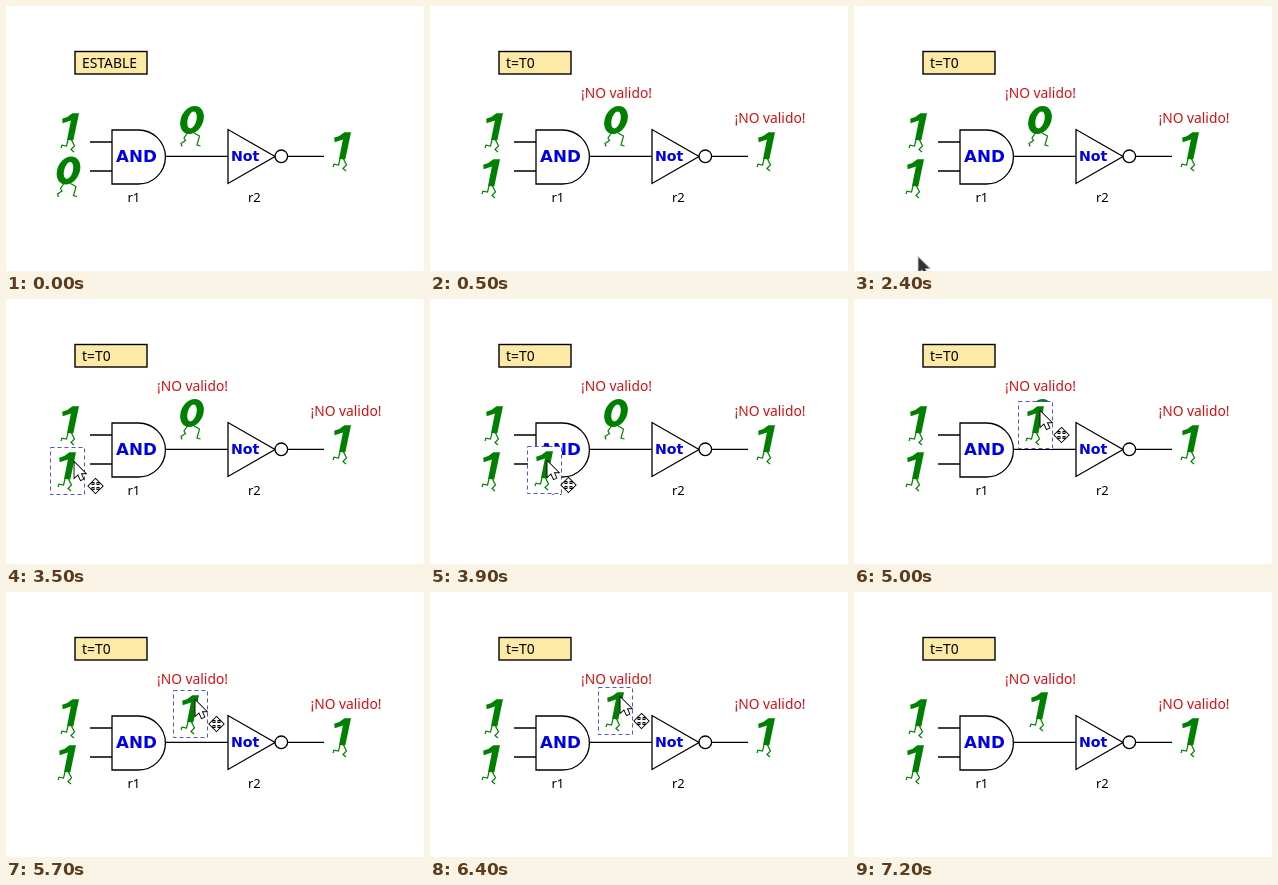
These frames come from a looping animation (418x265 px, 8000 ms). An HTML page with a canvas:

```html
<!DOCTYPE html>
<html lang="es">
<head>
<meta charset="utf-8">
<style>
html, body { margin: 0; width: 100%; height: 100%; overflow: hidden; background: #fff; }
canvas { display: block; }
</style>
</head>
<body>
<canvas id="stage" width="418" height="265"></canvas>
<script>
const ctx = document.getElementById('stage').getContext('2d');
const LOOP = 8000, STEP = 100;
const GREEN = '#008000', RED = '#d40f14', BLUE = '#0000e6';
const SANS = '"Noto Sans", "Open Sans", sans-serif';
const BOLD = '"DejaVu Sans", sans-serif';

const arrow = new Path2D('M0 0V15L3.6 11.8L6.2 17.6L8.8 16.4L6.3 10.8H10.8Z');
const moveCross = new Path2D('M0 -7L3 -4H1V-1H4V-3L7 0L4 3V1H1V4H3L0 7L-3 4H-1V1H-4V3L-7 0L-4 -3V-1H-1V-4H-3Z');
const handle = new Path2D('M-6 0L-2 -4V-1.5H2V-4L6 0L2 4V1.5H-2V4Z');
const oneBody = new Path2D('M25 4.3L19.3 31.6L13 31L16.9 11.6L8.7 14.3L8.2 9.8Q14 8.5 18.4 4.3Z');
const oneLegs = new Path2D('M14 31L12.5 37L8 36.2L7 39M17.5 31L20.5 37L17 40.5L20 43');
const zeroLegs = new Path2D('M-4 12L-8 18L-6.5 20.5L-11 23.5L-10 26.5M2 13L7.5 16L5 25L8.5 26');
const gates = new Path2D(
  'M106 124H132.4A27 27 0 0 1 132.4 178H106ZM222 123.5V177.5L269 150.5Z' +
  'M281.6 150.3A6.3 6.3 0 1 1 269 150.3A6.3 6.3 0 1 1 281.6 150.3' +
  'M84 136H106M84 165H106M159.4 150.3H222M282 150.3H318');

const ramp = (t, from, to) => Math.min(1, Math.max(0, (t - from) / (to - from)));
const easeOut = p => 1 - (1 - p) ** 2;

// The copied digit and the pointer share the phases of one drag.
function motion(t) {
  const enter = ramp(t, 2400, 3000), grab = ramp(t, 3200, 3500);
  const drag = ramp(t, 3500, 4300), lift = ramp(t, 4300, 4500);
  const settle = easeOut(ramp(t, 4600, 5400)), nudge = ramp(t, 5900, 6200);
  const leave = ramp(t, 6400, 6700);
  const dx = 12 * settle + nudge;
  const dy = -24 * drag ** 4 - 15 * settle - 3 * nudge;
  return {
    copy: [45 + 105 * drag + 6 * lift + dx, 149 - 11 * lift + dy].map(Math.round),
    pointer: [
      64 - enter - 9 * Math.sin(Math.PI * enter) + 5 * grab + 98 * drag + 11 * lift + dx + 135 * leave,
      251 - 95 * enter + 7 * grab - 16 * lift + dy + 20 * leave
    ].map(Math.round)
  };
}

function place(x, y, draw) {
  ctx.save();
  ctx.translate(x, y);
  draw();
  ctx.restore();
}

function shape(path, fill, stroke, width = 1) {
  ctx.lineWidth = width;
  ctx.strokeStyle = stroke;
  ctx.fillStyle = fill;
  if (stroke) ctx.stroke(path);
  if (fill) ctx.fill(path);
}

function text(str, x, y, color, font) {
  ctx.font = font;
  ctx.fillStyle = color;
  ctx.fillText(str, x, y);
}

function one(x, y) {
  place(x, y, () => {
    shape(oneBody, GREEN);
    shape(oneLegs, null, GREEN, 1.2);
  });
}

function zero(x, y) {
  place(x, y, () => {
    shape(zeroLegs, null, GREEN, 1.2);
    ctx.transform(1, 0, -0.2, 1, 0, 0);
    ctx.beginPath();
    ctx.ellipse(0, 0, 11.5, 14, 0, 0, 7);
    ctx.ellipse(0, 0, 4.5, 8.5, 0, 0, 7);
    ctx.fillStyle = GREEN;
    ctx.fill('evenodd');
  });
}

function circuit(stable) {
  ctx.fillStyle = '#fdeaa6';
  ctx.strokeStyle = '#000';
  ctx.lineWidth = 1.4;
  ctx.fillRect(69, 45.5, 72, 22.5);
  ctx.strokeRect(69, 45.5, 72, 22.5);
  text(stable ? 'ESTABLE' : 't=T0', 76, 61.5, '#000', '13.9px ' + SANS);

  shape(gates, null, '#000', 1.3);
  text('AND', 110, 156, BLUE, 'bold 16.7px ' + BOLD);
  text('Not', 225, 155, BLUE, 'bold 14.2px ' + BOLD);
  text('r1', 121.5, 196, '#000', '13px ' + SANS);
  text('r2', 242, 196, '#000', '13px ' + SANS);

  one(48, 103);
  one(320, 122);
  zero(186, 114);
  if (stable) {
    zero(62.5, 164.5);
  } else {
    one(45, 149);
    text('¡NO valido!', 151, 92, RED, '13.8px ' + SANS);
    text('¡NO valido!', 304.5, 117, RED, '13.8px ' + SANS);
  }
}

function copy(t, [x, y]) {
  ctx.fillStyle = '#fff';
  ctx.fillRect(x, y, 34, 47);
  one(x, y);
  if (t >= 7200) return;
  ctx.strokeStyle = '#5555c8';
  ctx.lineWidth = 1;
  ctx.setLineDash([4, 3]);
  ctx.strokeRect(x - 0.5, y - 0.5, 34, 47);
  ctx.setLineDash([]);
  if (t >= 6500) handles(x + 17, y + 23);
}

function handles(cx, cy) {
  for (const i of [-1, 0, 1]) for (const j of [-1, 0, 1]) {
    if (!i && !j) continue;
    place(cx + i * 24, cy + j * 30.5, () => {
      ctx.rotate(i && j ? i * j * Math.PI / 4 : j ? Math.PI / 2 : 0);
      shape(handle, '#000');
    });
  }
}

function pointer(t, [x, y]) {
  const dark = t < 2900;
  place(x + 0.5, y + 0.5, () => {
    if (dark) shape(arrow, '#333', '#bbb', 1.6);
    else shape(arrow, '#fff', '#000', 1.8);
  });
  if (!dark && t < 6500) place(x + 21.5, y + 24, () => shape(moveCross, '#fff', '#000', 1.8));
}

function frame(now) {
  const t = Math.floor(now % LOOP / STEP) * STEP;
  const pos = motion(t);
  ctx.fillStyle = '#fff';
  ctx.fillRect(0, 0, 418, 265);
  circuit(t < 500);
  if (t >= 3300) copy(t, pos.copy);
  if (t >= 2400 && t < 6800) pointer(t, pos.pointer);
}

const start = performance.now();
function loop() {
  frame(performance.now() - start);
  requestAnimationFrame(loop);
}
loop();
</script>
</body>
</html>
```
